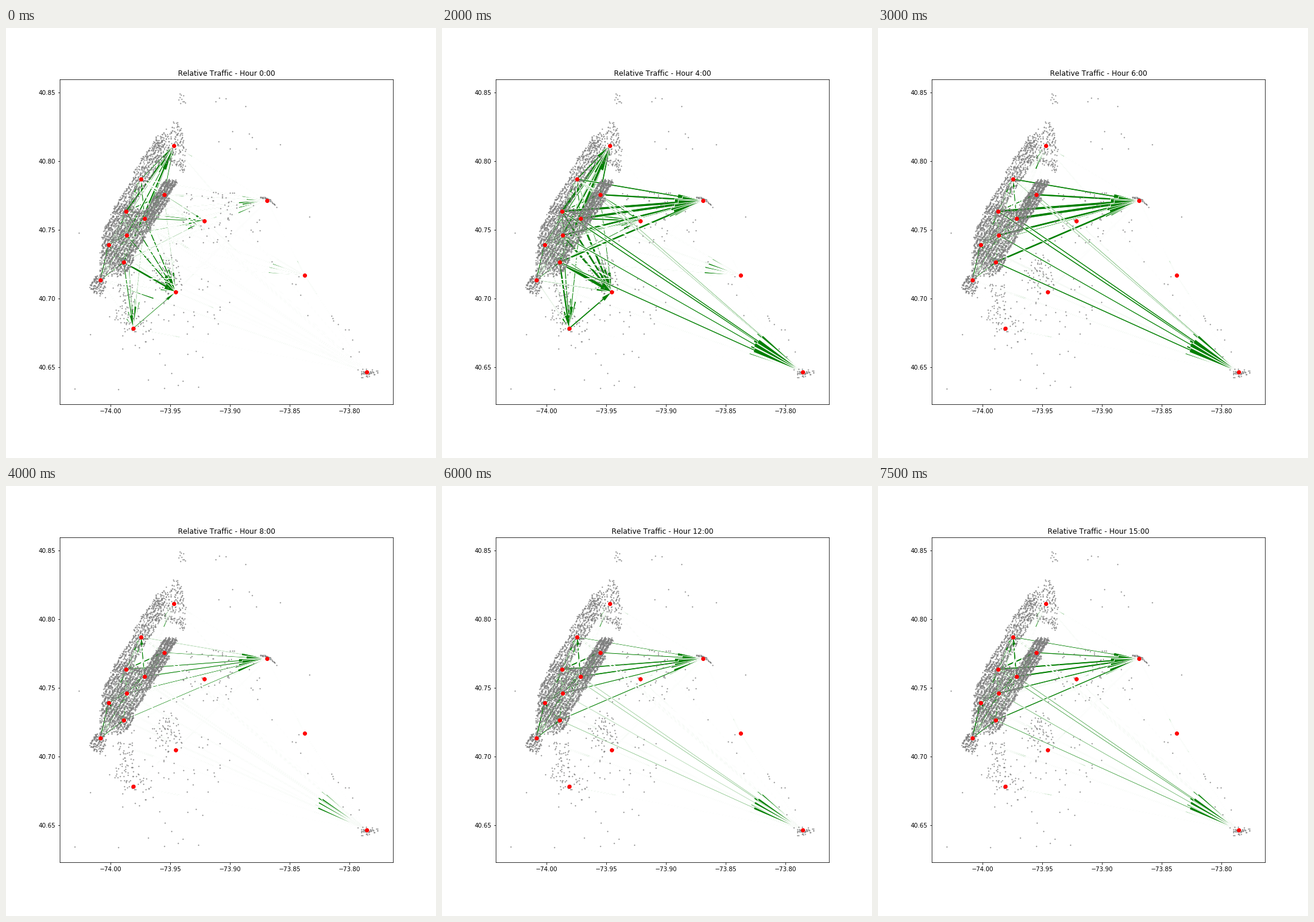
Recreate the animation shown at these times as a matplotlib script. Size 720 by 720 pixels, loop 8 s.

```python
from itertools import permutations

import matplotlib.pyplot as plt
import numpy as np
from matplotlib.animation import FuncAnimation
from matplotlib.patches import FancyArrow
from matplotlib.path import Path

SIZE, DPI = 720, 72
SX, SY = 2001.5, 2301.7  # pixels per degree
HOURS = 16
rng = np.random.default_rng(11)


def to_map(points):
    """Stage pixels to longitude and latitude."""
    p = np.asarray(points, float)
    return np.column_stack([-74 + (p[:, 0] - 175.2) / SX,
                            40.85 - (p[:, 1] - 108.1) / SY])


HUBS = dict(A=(281, 197), B=(226, 253), C=(264.5, 279), D=(201, 307),
            E=(232, 319), F=(202, 347), G=(171.5, 363), H=(197, 392),
            I=(158, 422), J=(213, 503), K=(284, 442), L=(332, 323),
            M=(437, 289), N=(500, 414), O=(604, 576))
ISLAND, OUTER = "BCDEFGHI", "AJKLN"
hub_xy = dict(zip(HUBS, to_map(list(HUBS.values()))))

# ---- pickup points -------------------------------------------------------

UPTOWN = np.array([0.54, -0.84])
CROSS = np.array([0.91, 0.41])

# districts of the island: number of points and outline
DISTRICTS = [
    (2500, [(157, 375), (165, 335), (186, 290), (229, 305), (262, 255),
            (287, 255), (262, 308), (222, 370), (200, 412), (170, 390)]),
    (500, [(229, 305), (262, 255), (287, 255), (240, 330)]),
    (560, [(186, 290), (250, 182), (265, 180), (259, 222), (211, 297)]),
    (210, [(250, 182), (286, 152), (302, 190), (300, 245), (259, 222)]),
    (160, [(140, 432), (147, 414), (166, 414), (165, 440), (152, 450)]),
    (140, [(157, 375), (200, 412), (158, 418)]),
]


def avenues(count, outline):
    """Points along slanted avenues inside an outline."""
    area, kept = Path(outline), np.empty((0, 2))
    while len(kept) < count:
        lane = rng.integers(-22, 23, 4000) * 5.2
        along = rng.uniform(-240, 260, 4000)
        p = (np.array([200, 350]) + lane[:, None] * CROSS
             + along[:, None] * UPTOWN)
        kept = np.vstack([kept, p[area.contains_points(p)]])
    return kept[:count] + rng.normal(0, 1.1, (count, 2))


def box(count, x0, x1, y0, y1):
    return rng.uniform((x0, y0), (x1, y1), (count, 2))


def blob(count, x, y, sx, sy):
    return rng.normal((x, y), (sx, sy), (count, 2))


def trail(count, start, end, spread):
    t = rng.uniform(0, 1, (count, 1))
    return (np.array(start) * (1 - t) + np.array(end) * t
            + rng.normal(0, spread, (count, 2)))


dots = np.vstack(
    [avenues(n, outline) for n, outline in DISTRICTS]
    + [blob(75, 199, 460, 11, 24), blob(35, 222, 500, 14, 20),
       blob(65, 268, 408, 13, 20), box(35, 250, 378, 420, 500),
       box(60, 295, 378, 274, 360), box(14, 375, 425, 275, 360),
       box(10, 289, 303, 110, 130), box(10, 310, 420, 115, 205),
       box(14, 215, 340, 510, 605), trail(16, (450, 375), (590, 550), 10),
       trail(18, (426, 283), (438, 285), .8),
       trail(18, (438, 286), (453, 298), .8),
       blob(34, 603, 579, 6, 4), box(8, 612, 624, 573, 581),
       [(115, 604), (188, 605), (122, 343), (141, 513), (459, 195),
        (508, 316)]])

# ---- traffic -------------------------------------------------------------

# how many trips start in each hub
BUSY = dict(B=.55, C=.55, D=1, E=.9, F=.85, G=.4, H=.9, I=.25, J=.45)


def step(h, middle, rate):
    return 1 / (1 + np.exp(-(h - middle) * rate))


def bump(h, middle, spread):
    return np.exp(-((h - middle) / spread) ** 2 / 2)


def night(h):
    return (.6 + .1 * h) * step(h, 5, -3)


def dawn(h):
    return bump(h, 5, 1.6)


def day(h):
    return step(h, 10, .67)


def returns(h):
    return (1 - bump(h, 2.8, 1.2)) * (1 - .5 * bump(h, 9.5, 1.5))


# demand for each destination outside the dense island
DEMAND = dict(
    A=lambda h: .8 + 4.8 * night(h),
    J=lambda h: .2 + 4.6 * night(h),
    K=lambda h: .2 + 6.2 * night(h),
    L=lambda h: .4 + 3.5 * night(h),
    M=lambda h: 1.1 + 5.5 * dawn(h) + 2.9 * day(h),
    N=lambda h: night(h),
    O=lambda h: .2 + 2.9 * dawn(h) + 1.6 * day(h))


def dist(a, b):
    return np.hypot(*np.subtract(HUBS[a], HUBS[b]))


def near(a, b):
    """Closeness of a to b, where the closest island hub counts as 1."""
    return min(1, min(dist(k, b) for k in ISLAND) / dist(a, b))


flows = []  # (start, end, weight, curve over the hours)
for start, peak in ("O", .9), ("M", 1.1):
    for end in OUTER:
        flows.append((start, end, .45 * peak * near(end, start), returns))
    for end in ISLAND:
        flows.append((start, end, peak * near(end, start), returns))
for a, b in [*permutations(ISLAND, 2), ("B", "A")]:
    weight = rng.uniform(.45, 1) * np.exp(-(dist(a, b) / 140) ** 2)
    flows.append((a, b, weight, lambda h: 3.2 + .8 * day(h)))
for end, curve in DEMAND.items():
    for start in ISLAND + ("J" if end == "K" else ""):
        reach = 1 if end == "A" else near(start, end)
        flows.append((start, end, BUSY[start] * reach, curve))

# ---- figure --------------------------------------------------------------

plt.rcParams.update({"font.family": "DejaVu Sans", "text.kerning_factor": 6})
fig = plt.figure(figsize=(SIZE / DPI, SIZE / DPI), dpi=DPI, facecolor="white")
ax = fig.add_axes([.125, .125, .775, .755])
ax.plot(*to_map(dots).T, "o", color="gray", ms=1, mew=1)
ax.plot(*np.array(list(hub_xy.values())).T, "ro", ms=6, zorder=3)
(left, bottom), (right, top) = to_map([(90, 630), (648, 86.4)])
ax.set_xlim(left, right)
ax.set_ylim(bottom, top)
ax.set_xticks(np.arange(-74, -73.79, .05))
ax.set_yticks(np.arange(40.65, 40.86, .05))
ax.xaxis.set_major_formatter("{x:.2f}")
ax.yaxis.set_major_formatter("{x:.2f}")
title = ax.set_title("", fontsize=12, pad=6.6)


def add_arrow(start, end, width):
    (x, y), (dx, dy) = hub_xy[start], hub_xy[end] - hub_xy[start]
    w = width / 2150
    ax.add_patch(FancyArrow(
        x, y, dx, dy, width=w, head_width=3 * w,
        head_length=.2 * np.hypot(dx, dy), length_includes_head=True,
        fc="green", ec="white", lw=1))


def draw(hour):
    for patch in list(ax.patches):
        patch.remove()
    for start, end, weight, curve in flows:
        width = weight * curve(hour)
        if width > .08:
            add_arrow(start, end, width)
    title.set_text(f"Relative Traffic - Hour {hour}:00")
    return [title, *ax.patches]


anim = FuncAnimation(fig, draw, frames=HOURS, interval=500,
                     repeat=True, repeat_delay=0, blit=False)
plt.show()
```
